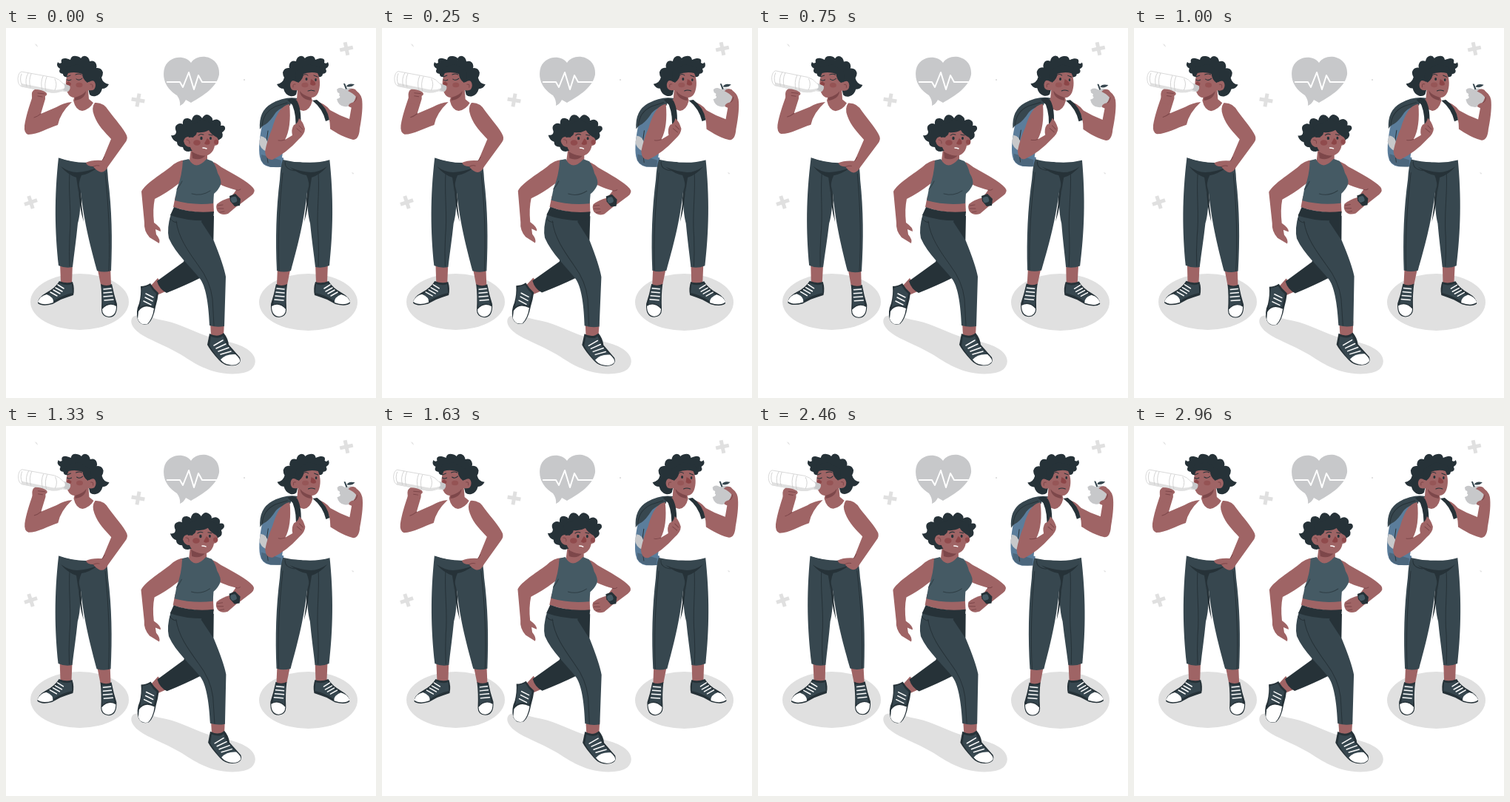
Recreate the animation shown at these times as an HTML page. Size 500 by 500 pixels, loop 3000 ms.

```html
<!DOCTYPE html>
<html lang="en">
<head>
<meta charset="utf-8">
<title>Healthy habits</title>
<style>
html, body { margin: 0; width: 100%; height: 100%; overflow: hidden; background: #fff; }
svg { display: block; width: 100%; height: 100%; }
.skin { fill: #9f6465; }
.shade { fill: #7d474a; }
.blush { fill: #8c4547; }
.cloth { fill: #37474f; }
.dark { fill: #263238; }
.top { fill: #455a64; }
.white { fill: #fff; }
.pale { fill: #e0e0e0; }
.grey { fill: #c7c8ca; }
.blue { fill: #5b7d9b; }
.line { fill: none; stroke: #263238; stroke-width: 1; stroke-linecap: round; stroke-linejoin: round; }
.fold { fill: none; stroke: #7d474a; stroke-width: 1; stroke-linecap: round; }
.lace { fill: none; stroke: #fff; stroke-width: 1.5; stroke-linecap: round; }
.thin { fill: none; stroke: #c9c9c9; stroke-width: .8; stroke-linecap: round; }
</style>
</head>
<body>
<svg viewBox="0 0 500 500" xmlns="http://www.w3.org/2000/svg">
  <defs>
    <path id="plus" d="M-2.5-9H2.5V-2.5H9V2.5H2.5V9H-2.5V2.5H-9V-2.5H-2.5Z"/>

    <g id="head">
      <path class="dark" d="M84 66Q77 67 77 62Q70 61 73 55Q67 52 70 46Q72 49 75 47Q73 40 81 41Q85 42 87 43Q88 37 95 38Q100 39 101 41Q105 35 111 40Q113 43 113 45Q120 43 122 49Q123 52 122 54Q129 53 131 60Q131 64 129 67Q131 75 139 76Q136 82 130 82Q128 90 121 92Q116 93 113 90L108 70Z"/>
      <path class="skin" d="M84 61C80 69 80 79 83 87Q86 94 92 94L91 98Q94 111 103 112Q113 110 118 101L112 96L111 84Q121 86 121 77Q120 68 112 73Q107 73 106 63Q94 58 84 61Z"/>
      <path class="shade" d="M93 94Q104 91 108 85Q107 96 93 98Z"/>
      <path class="dark" d="M79 60Q91 55 103 61Q103 69 110 74Q116 70 113 58L98 49L82 52Z"/>
      <path class="fold" d="M114 76Q118 75 117 80"/>
    </g>

    <g id="sideShoe">
      <path class="dark" d="M72 342Q82 346 90 343Q93 352 91 361Q82 364 74 367L63 373Q49 377 43 372Q43 364 54 358Q67 351 72 342Z"/>
      <path class="cloth" d="M73 345Q82 349 89 346L90 358Q76 361 64 369L56 360Q69 353 73 345Z"/>
      <path class="white" d="M43 370Q46 362 55 360Q65 364 64 371Q50 376 43 370Z"/>
      <path class="lace" d="M60 357L69 362M64 354L73 359M67 351L76 356M70 347L78 352"/>
    </g>

    <g id="frontShoe">
      <path class="dark" d="M128 346Q136 350 143 346Q146 361 150 373Q151 391 139 391Q129 390 129 381Q130 361 128 346Z"/>
      <path class="cloth" d="M130 350H143L147 374Q139 370 131 377Z"/>
      <path class="white" d="M130 380Q139 370 149 376Q149 389 139 390Q130 389 130 380Z"/>
      <path class="lace" d="M132 353L142 352M132 358L143 357M132 363L144 362M133 368L145 367"/>
    </g>

    <g id="legs">
      <path class="skin" d="M73 317H90L89 345Q82 349 74 344ZM123 322H141L142 347Q135 351 128 347Z"/>
      <use href="#sideShoe"/>
      <use href="#frontShoe"/>
      <path class="cloth" d="M71 175Q103 186 134 178Q137 186 138 205C143 245 144 285 142 328Q133 331 123 328C115 298 106 266 101 222Q101 250 97 264C95 285 92 305 90 323Q80 325 71 321C66 275 65 230 71 175Z"/>
      <path class="dark" d="M74 187Q85 195 96 195Q111 194 125 188Q111 198 102 199Q98 207 98 222L95 202Q83 198 74 187Z"/>
      <path class="dark" d="M98 210Q103 228 102 238L105 262Q98 240 98 210Z"/>
      <path class="line" d="M86 196C84 225 89 250 86 282Q85 303 86 322M134 196C138 234 141 280 139 328"/>
    </g>
  </defs>

  <g class="pale">
    <ellipse cx="99.5" cy="370" rx="66.5" ry="38"/>
    <ellipse cx="408.5" cy="370.5" rx="66.5" ry="38.5"/>
    <path d="M171 391C176 385 191 390 207 394C231 398 247 407 265 414C288 423 309 423 326 434C338 442 340 453 332 461C322 469 299 469 281 464C258 457 248 448 234 440C215 429 200 424 186 416C172 408 166 398 171 391Z"/>
    <use href="#plus" transform="translate(178.500 97.500) rotate(10)"/>
    <use href="#plus" transform="translate(460 28) rotate(-12)"/>
    <use href="#plus" transform="translate(33.500 235.500) rotate(-18)"/>
    <path d="M39 21L42 23L43 26L40 23ZM321 69H323V71H321ZM467 195L470 196L469 198Z"/>
  </g>

  <path class="grey" d="M250 47C241 35 217 38 213.500 57C211 73 220 84 231 91Q236 98 235 105Q241 102 243 97L250 101C267 91 285 80 288 63C290 38 260 32 250 47Z"/>
  <path d="M217 73H235L239 80L247 60L254 83L260 64L265 73H288" fill="none" stroke="#fff" stroke-width="2" stroke-linejoin="round"/>

  <g id="drinker">
    <use href="#legs"/>
    <path class="white" d="M90 98Q104 108 119 100Q128 123 129 147L133 178Q104 187 70 175Q73 151 71 130Z"/>
    <path class="skin" d="M36 92C31 107 27 119 25 132Q24 142 30 144C43 144 57 135 70 131Q73 115 89 100Q78 101 68 107L47 116L53 96Q54 86 47 83Z"/>
    <path class="fold" d="M47 116Q42 120 38 121"/>
    <use href="#head"/>
    <path class="blush" d="M84 72Q79 77 82 80Q87 80 88 75Z"/>
    <ellipse class="blush" cx="99" cy="77" rx="4.500" ry="3.300" opacity=".55"/>
    <path class="line" d="M82 70Q85 72 88 70M95 69Q99 72 103 68M82 66L87 64M94 63Q99 61 102 63"/>
    <path class="white" d="M21 59Q17 60 16 68Q16 77 21 79L61 87Q69 88 76 85L83 86L86 79L77 75Q72 69 65 67Z" stroke="#d0d0d0" stroke-width=".8"/>
    <path class="pale" d="M21 75L61 83Q70 85 80 81L84 84L75 85Q67 89 58 87L20 79Z"/>
    <path class="thin" d="M30 61Q25 69 28 79M34 62Q30 71 33 80M50 65Q46 74 49 84M55 66Q51 76 54 85M66 69Q70 76 66 84M21 62Q18 69 21 76"/>
    <path class="grey" d="M78 75L86 78Q88 82 84 86L77 84Q81 80 78 75Z"/>
    <path class="skin" d="M35 93Q34 85 39 83Q48 83 54 87Q57 90 53 92L48 94L47 104L36 102Z"/>
    <path class="fold" d="M43 88L52 89M43 92L49 93"/>
    <path class="skin" d="M120 101Q132 100 139 112C148 124 159 136 163 145Q165 150 161 155L138 187Q133 197 126 194Q120 191 118 187Q109 187 108 182Q116 178 130 179L142 150C134 141 124 132 119 118Q115 108 120 101Z"/>
    <path class="fold" d="M118 187Q123 185 126 186M130 179Q132 176 133 174"/>
  </g>

  <g id="hiker">
    <path class="blue" d="M347 126Q340 159 343 174Q345 186 357 188L374 188L382 105L362 108Z"/>
    <path class="cloth" d="M343 137Q341 112 359 102Q377 92 394 95L392 104Q372 105 364 115Q357 126 351 130Q346 132 343 137Z"/>
    <path class="line" d="M346 132Q347 114 364 106L380 101M354 139Q350 161 354 182"/>
    <path class="grey" d="M344 146Q353 147 354 158L352 167Q343 163 342 154Z"/>
    <path class="cloth" d="M345 171L372 179L371 188Q351 190 345 179Z" opacity=".4"/>
    <use href="#legs" transform="translate(508) scale(-1 1)"/>
    <path class="line" d="M377 181Q376 191 390 193"/>
    <path class="skin" d="M418 99Q430 101 438 111Q450 118 464 123L467 106L463 95Q463 84 470 83Q479 87 481 96Q483 109 478 136Q477 151 469 151C453 147 443 139 434 134Z"/>
    <path class="white" d="M386 99Q400 108 416 99Q424 105 432 113Q438 121 438 135L438 178Q406 187 373 175Q378 145 380 115Z"/>
    <use href="#head" transform="translate(505) scale(-1 1)"/>
    <path class="blush" d="M412 69Q420 73 418 77Q414 79 411 76Z"/>
    <ellipse class="blush" cx="404" cy="77" rx="4.500" ry="3.300" opacity=".45"/>
    <path class="line" d="M401 64Q405 61 408 64M416 64L421 66M408 85Q412 83 417 85"/>
    <ellipse class="dark" cx="406" cy="69" rx="1.500" ry="2"/>
    <ellipse class="dark" cx="418.500" cy="70" rx="1.300" ry="1.900"/>
    <path class="dark" d="M380 97Q388 93 393 98Q400 110 398 136L391 138Q393 119 387 104ZM414 98L420 97Q434 107 437 124L432 126Q428 109 414 98Z"/>
    <path class="skin" d="M383 103C371 105 365 118 360 135Q353 151 350 167Q351 179 360 178Q379 169 396 150Q404 143 404 136Q401 126 396 122Q394 130 389 131Q385 137 387 145L377 151Q386 134 383 103Z"/>
    <path class="fold" d="M377 151Q371 153 368 152M396 132L401 137M393 136L399 141"/>
    <path class="grey" d="M456 82Q451 79 447 83L448 87Q452 88 450 91Q454 94 447 96Q449 105 457 106Q461 107 464 105Q473 102 473 92Q473 82 465 81Q461 81 459 83Z"/>
    <path class="cloth" d="M460 79Q462 74 471 76Q467 81 460 79ZM456 75L459 83L461 82L458 75Z"/>
    <path class="skin" d="M462 85Q466 80 472 83L478 91L480 104L470 109L463 106Q462 102 470 100L473 93Q469 88 462 85Z"/>
    <path class="fold" d="M470 100Q474 98 474 93"/>
  </g>

  <g id="runner">
    <path class="skin" d="M205 338L195 349L204 361L218 355Z"/>
    <path class="dark" d="M182 349Q189 349 195 345Q199 352 206 358Q205 367 202 377Q199 394 192 400Q182 403 178 394Q175 383 180 372Q183 360 182 349Z"/>
    <path class="cloth" d="M184 351L194 348Q198 355 203 359L199 377Q189 371 181 378Z"/>
    <path class="white" d="M179 383Q186 372 200 379Q198 393 191 400Q181 402 178 393Z"/>
    <path class="lace" d="M189 359L199 364M188 364L198 369M186 369L196 374"/>
    <path class="dark" d="M240 316L204 342Q207 353 217 358Q242 348 262 338L280 305L281 254H260Z"/>
    <path class="skin" d="M276 397H295L294 416Q286 422 277 416Z"/>
    <path class="dark" d="M275 413Q286 419 294 412Q300 419 301 428L316 445Q319 454 309 456Q296 458 288 449Q276 436 272 428Z"/>
    <path class="cloth" d="M277 417Q288 421 293 416L298 428L311 442Q297 442 290 450Q279 437 275 429Z"/>
    <path class="white" d="M290 448Q297 440 310 441Q317 447 316 451Q311 457 302 455Q294 454 290 448Z"/>
    <path class="lace" d="M281 429L293 422M284 433L297 427M287 437L301 432M290 441L304 437"/>

    <path class="skin" d="M229 227H280L281 250Q253 251 226 242Z"/>
    <path class="cloth" d="M223 251Q217 271 220 284C229 305 250 323 263 340C271 352 274 378 275 402Q285 405 295 403L297 336Q294 320 281 288L264 262L266 255Z"/>
    <path class="dark" d="M227 242Q251 251 281 248L280 260Q247 262 222 253Z"/>
    <path class="line" d="M230 261C233 283 245 300 260 321Q276 342 279 366L281 402M222 257Q224 262 231 263"/>

    <path class="skin" d="M268 178Q282 180 291 188C307 197 326 207 334 216Q338 221 332 226L315 239L303 230L311 219C299 216 286 211 276 203Z"/>
    <path class="skin" d="M304 229L313 240L300 251Q291 254 286 248Q283 243 285 238Q292 232 304 229Z"/>
    <path class="fold" d="M286 240L293 239M286 244L294 244M289 249L295 248M311 219Q315 220 317 218"/>
    <path class="dark" d="M302 227L310 224L317 231L316 240L309 241L303 234Z"/>
    <rect class="top" x="304" y="228" width="8" height="8" rx="3" transform="rotate(-18 308 232)"/>

    <path class="skin" d="M250 163L248 179Q234 176 222 188C206 200 188 211 183 221L187 263Q186 274 194 283L207 291Q209 286 203 279L202 272L209 275Q210 270 200 263Q198 245 201 231Q217 223 231 212L249 199L276 194L272 178V166Z"/>
    <path class="top" d="M239 179L247 177Q256 194 271 177L279 180Q284 187 286 196Q292 206 290 212Q287 219 281 224L280 237Q253 240 228 233L231 217Q238 200 239 179Z"/>
    <path class="line" d="M251 224Q264 228 276 220M231 218Q235 214 238 207" opacity=".7"/>
    <path class="shade" d="M251 167Q260 173 270 172Q263 180 252 176Z"/>

    <path class="dark" d="M247 167Q240 167 239 161Q231 161 231 154Q225 152 223 145Q230 146 230 140Q226 131 235 129Q238 129 239 130Q238 121 246 122Q250 123 251 125Q253 115 261 118Q264 120 265 122Q270 114 276 119Q280 122 279 125Q286 121 290 127Q291 130 290 132Q297 131 296 137Q294 140 292 141Q295 148 288 151L277 162L254 165Z"/>
    <path class="skin" d="M253 148Q242 144 240 153Q242 161 249 161Q251 168 260 171Q271 175 277 169Q281 165 282 159Q289 158 287 151L281 140L266 135L257 140Z"/>
    <path class="dark" d="M247 148Q257 148 258 141Q267 142 274 138Q277 144 287 149L286 132L266 124L244 133Z"/>
    <ellipse class="blush" cx="258" cy="155" rx="4.800" ry="3.800" opacity=".8"/>
    <ellipse class="blush" cx="284" cy="154" rx="3" ry="3.300" opacity=".8"/>
    <path class="blush" d="M272 149Q277 153 275 157Q270 159 268 156Z"/>
    <ellipse class="dark" cx="264" cy="149" rx="1.700" ry="2.200"/>
    <ellipse class="dark" cx="276.500" cy="149" rx="1.500" ry="2.100"/>
    <path class="line" d="M260 145Q263 142 267 144M274 144L279 145"/>
    <path class="lace" d="M266 162Q269 162 271 163"/>
    <path class="fold" d="M244 151Q249 151 248 156"/>
  </g>
</svg>
<script>
const swayers = [
  { id: 'drinker', period: 3000, x: 90, y: 214 },
  { id: 'hiker', period: 3000, x: 412, y: 214 },
  { id: 'runner', period: 1500, x: 256, y: 286 }
].map(s => ({ ...s, node: document.getElementById(s.id) }));

// Linear sway in degrees: 0, +1, 0, -1, 0 over one phase.
const sway = p => p < .25 ? 4 * p : p < .75 ? 2 - 4 * p : 4 * p - 4;

function draw(time) {
  for (const { node, period, x, y } of swayers) {
    const angle = sway((time % period) / period);
    node.setAttribute('transform', `rotate(${angle.toFixed(4)} ${x} ${y})`);
  }
}

let start;
function tick(now) {
  start ??= now;
  draw(now - start);
  requestAnimationFrame(tick);
}
draw(0);
requestAnimationFrame(tick);
</script>
</body>
</html>
```
